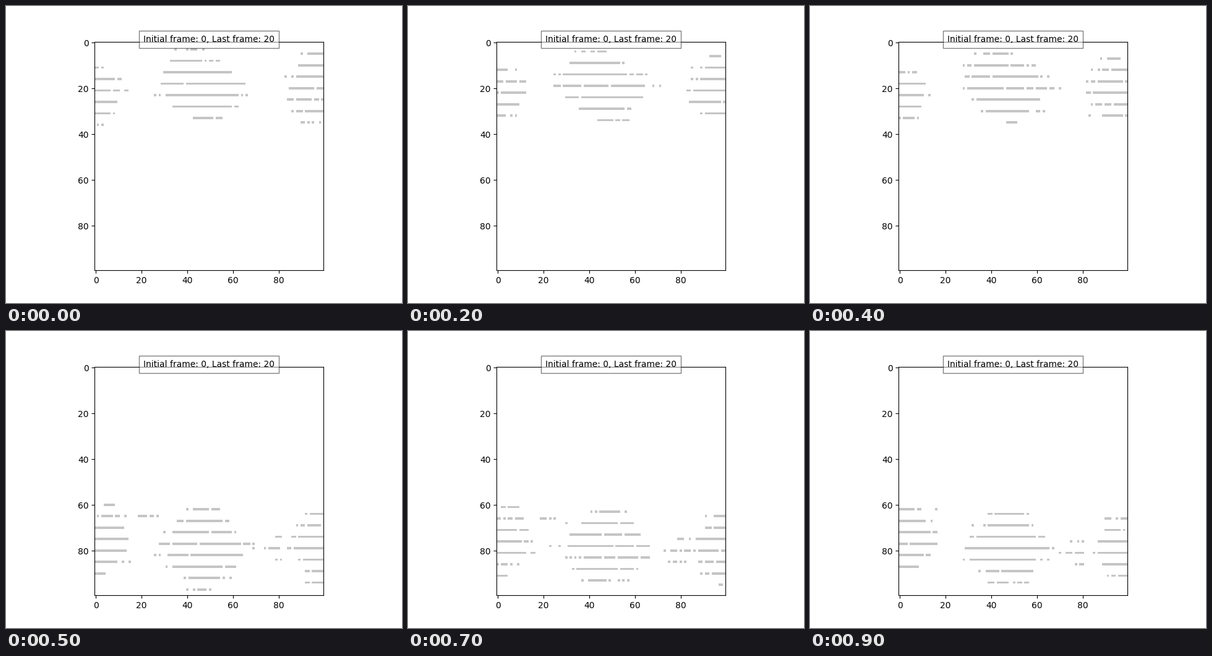
Recreate the animation shown at these times as a matplotlib script. Size 640 by 480 pixels, loop 1000 ms.

```python
from collections import namedtuple

import numpy as np
import matplotlib.pyplot as plt
from matplotlib.animation import FuncAnimation

SIZE = 100
FRAMES = 10
CUT = 5          # the scene changes here
ROW_GAP = 5      # only every fifth row is sampled
GREY = 0.77
LEFT, CENTRE, RIGHT = 1, 3, 0   # row phase of each sensor

Blob = namedtuple("Blob", "phase x width top peak bottom lean", defaults=[0])

UPPER = [
    Blob(LEFT, 0, 13, 9.5, 19, 36.5),
    Blob(CENTRE, 46, 20, 2.5, 19, 36, lean=0.2),
    Blob(RIGHT, 95, 12, 4, 22, 36),
]
LOWER = [
    Blob(LEFT, 3, 13, 57, 78, 92, lean=-0.15),
    Blob(LEFT, 22, 3, 64, 65.5, 67),
    Blob(CENTRE, 47, 19, 59, 79, 98),
    Blob(RIGHT, 97, 11.5, 61, 78, 96),
    Blob(RIGHT, 78.5, 2.5, 72, 79, 88),
    Blob(RIGHT, 80.5, 2.5, 96.5, 97.5, 98.5),
]

cols = np.arange(SIZE)


def fire_chance(blob, row):
    """Chance of a mark in each column: high inside, fading at the edges."""
    end = blob.top if row < blob.peak else blob.bottom
    away = (row - blob.peak) / (end - blob.peak)
    half = blob.width * (1 - away) ** 0.7
    middle = blob.x + blob.lean * (row - blob.peak)
    depth = half - np.abs(cols - middle)
    return 0.96 / (1 + np.exp(-(depth + 0.7) / 1.4))


def scan(frame):
    rng = np.random.default_rng(40 + frame)
    late = frame >= CUT
    shift = 3 * (frame + 3 * late)
    grid = np.ones((SIZE, SIZE))
    for blob in LOWER if late else UPPER:
        first = (blob.phase + shift) % ROW_GAP
        for row in range(first, SIZE, ROW_GAP):
            if blob.top < row < blob.bottom:
                marks = rng.random(SIZE) < fire_chance(blob, row)
                grid[row, marks] = GREY
    return grid


fig, ax = plt.subplots(figsize=(6.4, 4.8), dpi=100)
image = ax.imshow(scan(0), cmap="gray", vmin=0, vmax=1,
                  interpolation="nearest")
ax.text(0.5, 1.0, "Initial frame: 0, Last frame: 20", ha="center",
        transform=ax.transAxes,
        bbox={"facecolor": "w", "alpha": 0.5, "pad": 5})


def update(frame):
    image.set_data(scan(frame))
    return [image]


anim = FuncAnimation(fig, update, frames=FRAMES, interval=100, repeat=True)
plt.show()
```
